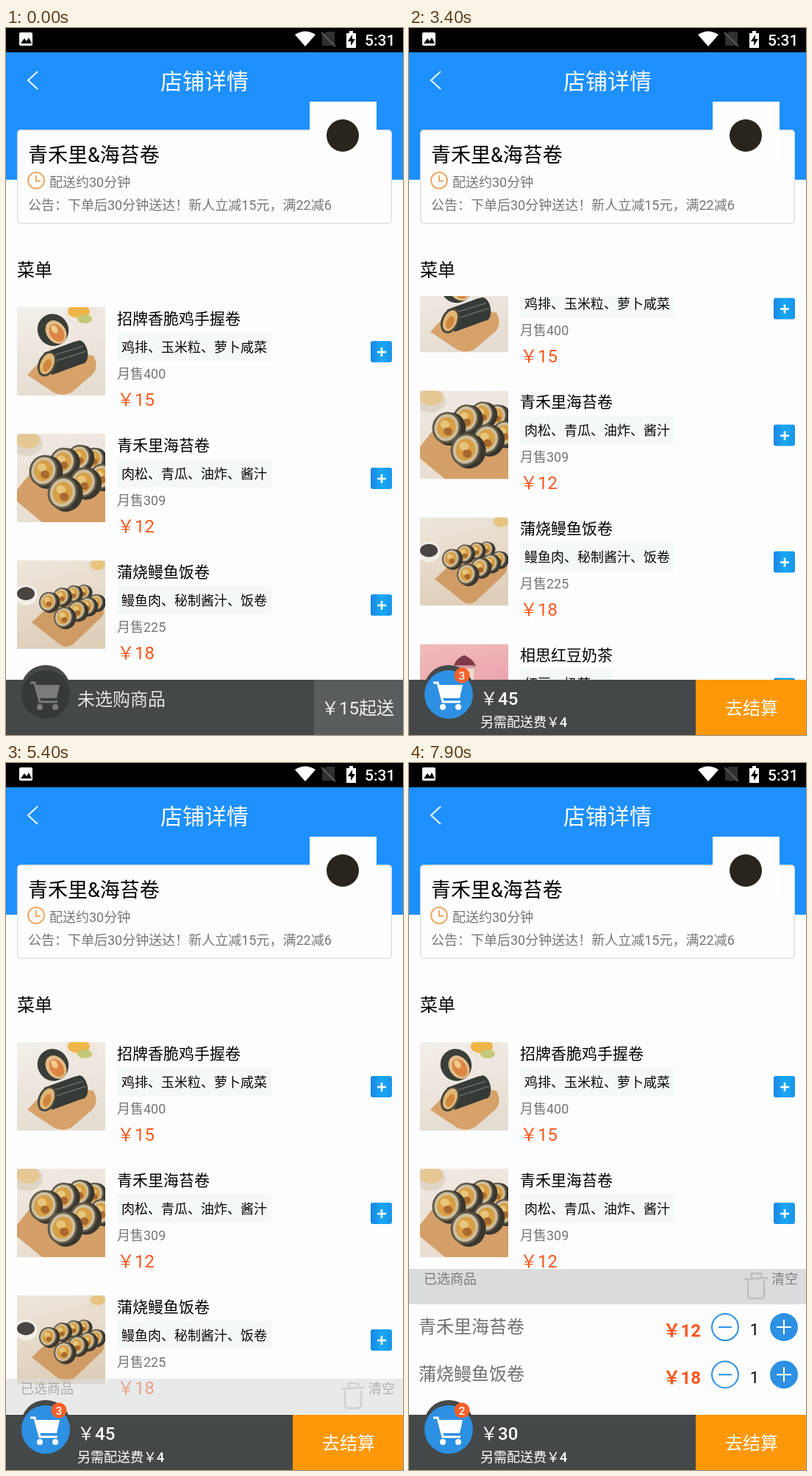
An HTML page with a canvas that plays this animation: 540 by 960 pixels, repeating every 8 s.

```html
<!DOCTYPE html>
<html lang="zh-CN">
<head>
<meta charset="utf-8">
<style>
html, body { margin: 0; width: 100%; height: 100%; overflow: hidden; background: #fdfdfd; }
canvas { display: block; }
</style>
</head>
<body>
<canvas id="stage" width="540" height="960"></canvas>
<script>
const c = document.getElementById('stage').getContext('2d');
const LOOP = 8000, PAPER = '#fdfdfd', BAR = '#454848', GRAY = '#767676', ORANGE = '#f9581f', BLUE = '#2d90e2';
const LIST_TOP = 364, BAR_TOP = 885, PITCH = 172;

const items = [
  { name: '招牌香脆鸡手握卷', tags: '鸡排、玉米粒、萝卜咸菜', sold: 400, price: 15, photo: handRolls },
  { name: '青禾里海苔卷', tags: '肉松、青瓜、油炸、酱汁', sold: 309, price: 12, photo: bigRolls },
  { name: '蒲烧鳗鱼饭卷', tags: '鳗鱼肉、秘制酱汁、饭卷', sold: 225, price: 18, photo: eelRolls },
  { name: '相思红豆奶茶', tags: '红豆、奶茶', sold: 88, price: 9, photo: milkTea }
];
const presses = [[2550, 2700], [2800, 2900], [3000, 3100]];
const REMOVE_AT = 7500;

const clamp = v => Math.min(1, Math.max(0, v));
const ramp = (t, from, to) => clamp((t - from) / (to - from));
const smooth = v => v * v * (3 - 2 * v);

// Drawing helpers
function rect(x, y, w, h, fill, r = 0) {
  c.fillStyle = fill;
  c.beginPath();
  c.roundRect(x, y, w, h, r);
  c.fill();
}
function oval(x, y, rx, ry, fill, turn = 0) {
  c.fillStyle = fill;
  c.beginPath();
  c.ellipse(x, y, rx, ry, turn, 0, 7);
  c.fill();
}
const disc = (x, y, r, fill) => oval(x, y, r, r, fill);
function path(d, fill, stroke, width = 2) {
  const p = new Path2D(d);
  if (fill) { c.fillStyle = fill; c.fill(p); }
  if (stroke) { c.strokeStyle = stroke; c.lineWidth = width; c.stroke(p); }
}
// Text is placed by its left edge and vertical middle
function text(s, x, mid, size, fill, weight = 400, align = 'left') {
  c.font = `${weight} ${size}px Roboto, "Noto Sans CJK SC", sans-serif`;
  c.textAlign = align;
  c.fillStyle = fill;
  c.fillText(s, x, mid + size * .37);
}
function at(x, y, draw) {
  c.save();
  c.translate(x, y);
  draw();
  c.restore();
}
function clipped(x, y, w, h, draw) {
  c.save();
  c.beginPath();
  c.rect(x, y, w, h);
  c.clip();
  draw();
  c.restore();
}

// Food pictures, each 120 by 120
function backdrop(top, bottom) {
  const g = c.createLinearGradient(0, 0, 30, 120);
  g.addColorStop(0, top);
  g.addColorStop(1, bottom);
  rect(0, 0, 120, 120, g);
}
function slice(x, y, r) {
  oval(x + r * .25, y + r * .1, r, r * 1.08, '#3a372f', .3);
  oval(x, y, r * .92, r * 1.02, '#625a4a', .3);
  oval(x, y, r * .78, r * .88, '#cdbf9f', .3);
  oval(x, y, r * .6, r * .68, '#d99f45', .3);
  oval(x - r * .1, y - r * .2, r * .3, r * .26, '#e6c67c', .3);
  oval(x + r * .1, y + r * .25, r * .28, r * .26, '#a8692f', .3);
}
function handRolls() {
  backdrop('#f3efea', '#e6ddd2');
  oval(88, 9, 22, 16, '#eee6da');
  oval(84, 6, 15, 9, '#efb548');
  oval(92, 16, 10, 6, '#c3c878');
  path('M14 92L46 58L104 66Q112 82 102 92L74 116Q62 122 50 116Z', '#d6a26a');
  oval(49, 31, 21, 22, '#3b3d38', -.5);
  oval(53, 34, 13, 17, '#e2bd8a', -.6);
  oval(54, 35, 9, 13, '#dc8544', -.6);
  oval(51, 30, 4, 6, '#efcb90', -.6);
  path('M42 77L86 61', null, '#363a36', 32);
  oval(87, 61, 9, 16, '#363a36', -.2);
  path('M48 66L90 53M50 74L94 60', null, '#646a66', 1.5);
  oval(41, 77, 12, 18, '#484840', .4);
  oval(41, 77, 9, 15, '#e0b674', .4);
  oval(41, 79, 5, 9, '#d0863f', .4);
}
function bigRolls() {
  backdrop('#f0eae4', '#e8ddd0');
  oval(14, 13, 21, 17, '#e0d6c8');
  oval(15, 9, 16, 11, '#e6c894');
  path('M0 76L24 46L120 66V120H34L0 92Z', '#d49f68');
  for (const [x, y, r] of [[104, 34, 15], [84, 32, 17], [62, 38, 19], [36, 50, 21], [114, 58, 17], [90, 66, 20], [62, 80, 22]]) slice(x, y, r);
}
function eelRolls() {
  backdrop('#eee6dc', '#dfcfba');
  oval(12, 47, 16, 14, '#f2eee8');
  oval(12, 45, 12, 9, '#4a4442');
  oval(110, 9, 14, 11, '#e6dccc');
  oval(110, 6, 10, 7, '#e6c480');
  path('M20 84L56 50L114 58Q122 66 116 76L76 114Q66 120 58 114Z', '#d09c66');
  for (const [x, y, r] of [[90, 43, 10], [76, 45, 11], [60, 49, 12], [42, 56, 13], [107, 57, 11], [95, 62, 12], [81, 68, 13], [63, 77, 14]]) slice(x, y, r);
}
function milkTea() {
  backdrop('#f2bcb8', '#e596a8');
  oval(22, 122, 80, 28, '#d88798');
  path('M48 28H74L70 104Q60 108 52 104Z', '#efdccc');
  path('M50 74H72L70 104Q60 108 52 104Z', '#d9a598');
  path('M46 30Q48 20 60 15Q72 20 76 30Q60 36 46 30Z', '#7e3a48');
  rect(47, 29, 28, 4, '#d9a0a0', 2);
  disc(60, 53, 6, '#383436');
  path('M107 78L100 62L106 68L108 58L111 68L116 62L112 78Z', '#6e8a68');
}

function statusBar() {
  rect(0, 0, 540, 33, '#000');
  rect(18, 6, 18, 18, '#fff', 2);
  path('M20 21L25 14L28 18L31 13L35 21Z', '#000');
  path('M393 9Q407 0 421 9L407 25Z', '#fff');
  path('M430 9L436 5H447V24H430Z', '#303030');
  path('M429 6L448 25', null, '#5a5a5a', 2);
  path('M463 7H467V4H472V7H476V27H463Z', '#fff');
  path('M471 9L465 18H469V24L475 15H471Z', '#000');
  text('5:31', 488, 16, 21, '#fff', 500);
}

function header() {
  rect(0, 33, 540, 173, '#1e90ff');
  path('M43 59L30 71L43 83', null, '#f4f8ff', 2);
  text('店铺详情', 270, 72, 30, '#fff', 400, 'center');
  rect(15, 138, 510, 128, '#dde1e4', 5);
  rect(16.5, 139.5, 507, 125, PAPER, 4);
  rect(413, 100, 91, 88, '#fefefe');
  disc(458, 146, 22, '#29251e');
  text('青禾里&海苔卷', 30, 172, 27, '#000');
  path('M52 207A11 11 0 1 1 30 207A11 11 0 1 1 52 207M41 200V208H47', null, '#efa964', 2);
  text('配送约30分钟', 59, 209, 18, GRAY);
  text('公告：下单后30分钟送达！新人立减15元，满22减6', 30, 240, 18, GRAY);
  text('菜单', 15, 328, 24, '#000');
}

function plusButton(x, y, pressed) {
  const g = c.createLinearGradient(x, 0, x + 29, 0);
  g.addColorStop(0, pressed ? '#686868' : '#1b84e4');
  g.addColorStop(.5, pressed ? '#787878' : '#18a8f2');
  g.addColorStop(1, pressed ? '#6c6c6c' : '#1a94ea');
  rect(x, y, 29, 29, g, 3);
  path(`M${x + 9} ${y + 15}h12m-6 -6v12`, null, '#fff', 2.6);
}

function item(it, pressed) {
  clipped(0, 0, 120, 120, it.photo);
  text(it.name, 136, 15, 21, '#000');
  const width = Math.max(it.name.length * 21, it.tags.length * 18 + 12);
  rect(136, 34, width, 39, '#f5f8f9');
  text(it.tags, 142, 54, 18, '#080808');
  text('月售' + it.sold, 136, 90, 18, GRAY);
  text('￥' + it.price, 136, 125, 24, ORANGE);
  plusButton(481, 46, pressed);
}

function list(t) {
  const back = smooth(ramp(t, 4600, 5150));
  const scroll = 148.5 * ramp(t, 3200, 3710) * (1 - back);
  clipped(0, LIST_TOP, 540, BAR_TOP - LIST_TOP, () => {
    items.forEach((it, i) => {
      const press = presses[i];
      const pressed = press && t >= press[0] && t < press[1];
      at(15, 379 + i * PITCH - scroll, () => item(it, pressed));
    });
    // Overscroll glow at the end of the list
    const glow = ramp(t, 3710, 3980) * (1 - ramp(t, 4020, 4400));
    if (glow > 0) disc(355, BAR_TOP - 89 * glow + 1064, 1064, `rgba(50,52,54,${.54 * glow})`);
  });
}

function sheetRow(it, y) {
  text(it.name, 13, y - 1, 24, '#707070');
  text('￥' + it.price, 397, y + 4, 24, ORANGE, 700, 'right');
  path(`M448 ${y}a18 18 0 1 1 -36 0a18 18 0 1 1 36 0M421 ${y}h18`, null, BLUE, 2);
  text('1', 470, y + 3, 22, '#000', 400, 'center');
  disc(510, y, 19, BLUE);
  path(`M500 ${y}h20m-10 -10v20`, null, '#fff', 2);
}

function sheet(t, chosen) {
  const open = smooth(ramp(t, 5300, 5664));
  if (!open) return;
  const height = 69 + 64.4 * chosen.length;
  clipped(0, LIST_TOP, 540, BAR_TOP - LIST_TOP, () => {
    c.globalAlpha = clamp(open * 3);
    at(0, Math.round(BAR_TOP - height * open), () => {
      rect(0, 0, 540, 48, '#d9dbdc');
      rect(0, 48, 540, height, PAPER);
      text('已选商品', 20, 13, 18, '#7c7c7c', 500);
      text('清空', 529, 13, 18, '#808080', 400, 'right');
      path('M456 14L488 12M466 12V6H479V12M461 16V36Q462 40 466 40H478Q482 40 483 36V16', null, '#bcbebf', 2.5);
      chosen.forEach((it, i) => sheetRow(it, 79 + 64.4 * i));
    });
  });
}

function cart(count) {
  const ink = count ? '#fff' : '#7a7c7c';
  disc(54, 899, 34, BAR);
  disc(54, 905, 33, count ? BLUE : '#363939');
  path('M33 889H39L46 915H70', null, ink, 3);
  path('M40 892H73L69 910H45Z', ink);
  disc(46, 922, 4, ink);
  disc(67, 922, 4, ink);
  if (count) {
    disc(72, 879, 10.5, '#f95f2a');
    text(count, 72, 879, 15, '#fff', 500, 'center');
  }
}

function bottomBar(chosen) {
  rect(0, BAR_TOP, 540, 75, BAR);
  if (chosen.length) {
    const total = chosen.reduce((sum, it) => sum + it.price, 0);
    rect(390, BAR_TOP, 150, 75, '#ff9808');
    text('￥' + total, 97, 910, 24, '#fff', 500);
    text('另需配送费￥4', 97, 942, 18, '#fff', 500);
    text('去结算', 466, 923, 24, '#fff', 400, 'center');
  } else {
    rect(419, BAR_TOP, 121, 75, '#5a5d5e');
    text('未选购商品', 97, 911, 24, '#e4e4e4');
    text('￥15起送', 528, 923, 24, '#f0f0f0', 400, 'right');
  }
  cart(chosen.length);
}

function frame() {
  const t = performance.now() % LOOP;
  const chosen = items.filter((it, i) => presses[i] && t >= presses[i][1] && !(i === 0 && t >= REMOVE_AT));
  rect(0, 0, 540, 960, PAPER);
  statusBar();
  header();
  list(t);
  sheet(t, chosen);
  bottomBar(chosen);
  requestAnimationFrame(frame);
}
frame();
</script>
</body>
</html>
```
